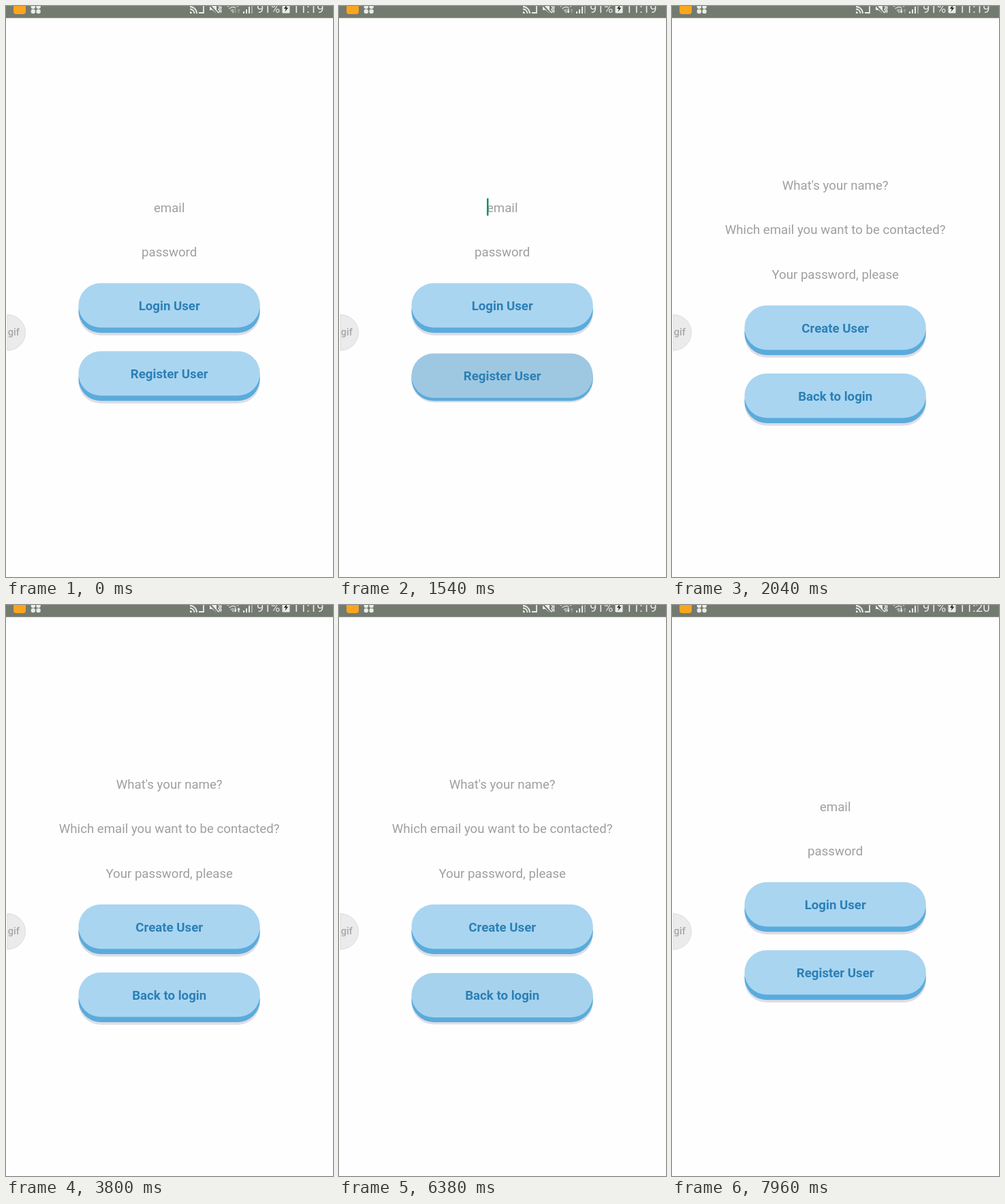
An HTML page for the animation above (8000 ms loop, 480x839 px).

```html
<!DOCTYPE html>
<html lang="en">
<head>
<meta charset="utf-8">
<title>Login and register</title>
<style>
  @property --p { syntax: "<number>"; inherits: true; initial-value: 0; }

  html, body { margin: 0; width: 100%; height: 100%; overflow: hidden; background: #fefefe; }
  svg { display: block; width: 100%; height: 100%; }
  text { font-family: Roboto, "Open Sans", sans-serif; }

  .field { font-size: 18.67px; fill: #9f9f9f; text-anchor: middle; }
  .label { font-size: 18.67px; font-weight: 700; fill: #2c80b5; text-anchor: middle; }

  /* --p is how far a button is pressed, 0 to 1 */
  .face { transform: translateY(calc(var(--p) * 7.7px)); }
  .shadow { transform: translateY(calc(var(--p) * -3.8px)); }
  .shade { opacity: calc(var(--p) * .15); }

  .cursor, .login, .signup, .down, .up, .early, .late, .register, .back {
    animation: 8s step-end infinite;
  }
  .cursor { animation-name: blink; }
  .login, .early { visibility: visible; }
  .login { animation-name: login; }
  .signup { animation-name: signup; }
  .down { animation-name: down; }
  .up { animation-name: up; }
  .early { animation-name: early; }
  .late { animation-name: late; }
  .register { animation-name: register; }
  .back { animation-name: back; }

  @keyframes blink {
    0%, 9.125%, 23.375%, 100% { opacity: 0; }
    3%, 15.25% { opacity: 1; }
  }
  @keyframes login {
    0%, 89%, 100% { visibility: visible; }
    25.5% { visibility: hidden; }
  }
  @keyframes signup {
    0%, 89%, 100% { visibility: hidden; }
    25.5% { visibility: visible; }
  }
  @keyframes down {
    0%, 36.5% { fill: #989e96; }
    8%, 47.5%, 100% { fill: #eef0ee; }
  }
  @keyframes up {
    0%, 65.75%, 100% { fill: #989e96; }
    47.5% { fill: #eef0ee; }
  }
  @keyframes early {
    0% { visibility: visible; }
    99.5%, 100% { visibility: hidden; }
  }
  @keyframes late {
    0% { visibility: hidden; }
    99.5%, 100% { visibility: visible; }
  }
  @keyframes register {
    0%, 25.5%, 100% { --p: 0; }
    17.75% { --p: .13; }
    19% { --p: .42; }
    19.5% { --p: .68; }
    20% { --p: .87; }
    20.5% { --p: .97; }
    21% { --p: 1; }
  }
  @keyframes back {
    0%, 89%, 100% { --p: 0; }
    79.75% { --p: .1; }
    81% { --p: .42; }
    82% { --p: .68; }
    83% { --p: .87; }
    84% { --p: .97; }
    85% { --p: 1; }
  }
</style>
</head>
<body>
<svg viewBox="0 0 480 839" preserveAspectRatio="none">
  <defs>
    <rect id="pill" x="106.4" width="266.4" height="65.2" rx="32.6"/>
  </defs>

  <!-- status bar -->
  <rect width="480" height="17.7" fill="#737a70"/>
  <rect x="11" y="-6" width="18" height="18" rx="4" fill="#faa51e"/>
  <g fill="#e9ebe8">
    <circle cx="39.8" cy="1" r="3.2"/>
    <circle cx="47.6" cy="1" r="3.2"/>
    <circle cx="39.8" cy="8" r="3.2"/>
    <circle cx="47.6" cy="8" r="3.2"/>

    <path d="M299 0h4l6-5v16l-6-5h-4z"/>
    <path d="M270 8a3 3 0 0 1 3 3h-3z"/>
    <path d="M348 8h2v3h-2zM352 5h2v6h-2zM356 1h2v10h-2z"/>
    <path d="M360 -4h2v15h-2z" fill="#a5aaa3"/>
    <path d="M405.5 -3h11v12.5q0 1-1 1h-9q-1 0-1-1z"/>
  </g>
  <g fill="none" stroke="#e9ebe8" stroke-width="1.8">
    <path d="M271 1v-5h19v14h-7M270 4.5a6.500 6.500 0 0 1 6.500 6.500M270 1a10 10 0 0 1 10 10"/>
    <path d="M298 -3l13 14" stroke="#737a70" stroke-width="3"/>
    <path d="M299 -4l13 14M312 0l2 2.500-2 2.500 2 2.500-2 2.500M315 0l1 2.500-1 2.500 1 2.500-1 2.500" stroke-width="1.400"/>
    <path d="M325 1q8-6.500 16 0M327.500 4q5.500-4.500 10 -1M330 7q2.500-2 4.500-1" stroke="#c5c9c3"/>
  </g>
  <path d="M331 8l3-1v4z" fill="#c5c9c3"/>
  <path class="down" d="M335.800 4h1.600v3.500h1.600l-2.400 3.300-2.400-3.300h1.600z"/>
  <path class="up" d="M340.800 10.500h1.600v-3.500h1.600l-2.400-3.300-2.400 3.300h1.600z"/>
  <path d="M412.500 -2l-4.500 6h2.800l-1.300 4.500 4.800-6h-2.800z" fill="#20241f"/>
  <g font-size="18.5" fill="#e9ebe8">
    <text x="368" y="10.300">91%</text>
    <text class="early" x="420.500" y="10.300">11:19</text>
    <text class="late" x="420.500" y="10.300">11:20</text>
  </g>

  <!-- floating tab -->
  <path d="M2 453.500a26.500 26.300 0 0 1 0 52.600z" fill="#ecebec" stroke="#d6d6d6" stroke-width=".8"/>
  <text x="2.800" y="483.500" font-size="14.500" font-weight="500" fill="#a9a7aa">gif</text>

  <g class="login">
    <text class="field" x="239.700" y="302.700">email</text>
    <text class="field" x="239.700" y="368">password</text>
    <rect class="cursor" x="217" y="282.500" width="2.500" height="25.500" fill="#108f73"/>
    <g class="button" data-y="407.300" data-label="Login User"></g>
    <g class="button register" data-y="507.300" data-label="Register User"></g>
  </g>
  <g class="signup">
    <text class="field" x="239.700" y="270">What's your name?</text>
    <text class="field" x="239.700" y="335.300">Which email you want to be contacted?</text>
    <text class="field" x="239.700" y="400.700">Your password, please</text>
    <g class="button" data-y="440" data-label="Create User"></g>
    <g class="button back" data-y="540" data-label="Back to login"></g>
  </g>
</svg>
<script>
  for (const b of document.querySelectorAll(".button")) {
    const y = +b.dataset.y;
    b.innerHTML = `
      <g class="shadow"><use href="#pill" y="${y + 11.5}" fill="#dedde5"/></g>
      <use href="#pill" y="${y + 7.7}" fill="#5aabdc"/>
      <g class="face">
        <use href="#pill" y="${y}" fill="#a9d5f1"/>
        <use class="shade" href="#pill" y="${y}" fill="#000"/>
        <text class="label" x="239.700" y="${y + 39.7}">${b.dataset.label}</text>
      </g>`;
  }
</script>
</body>
</html>
```
